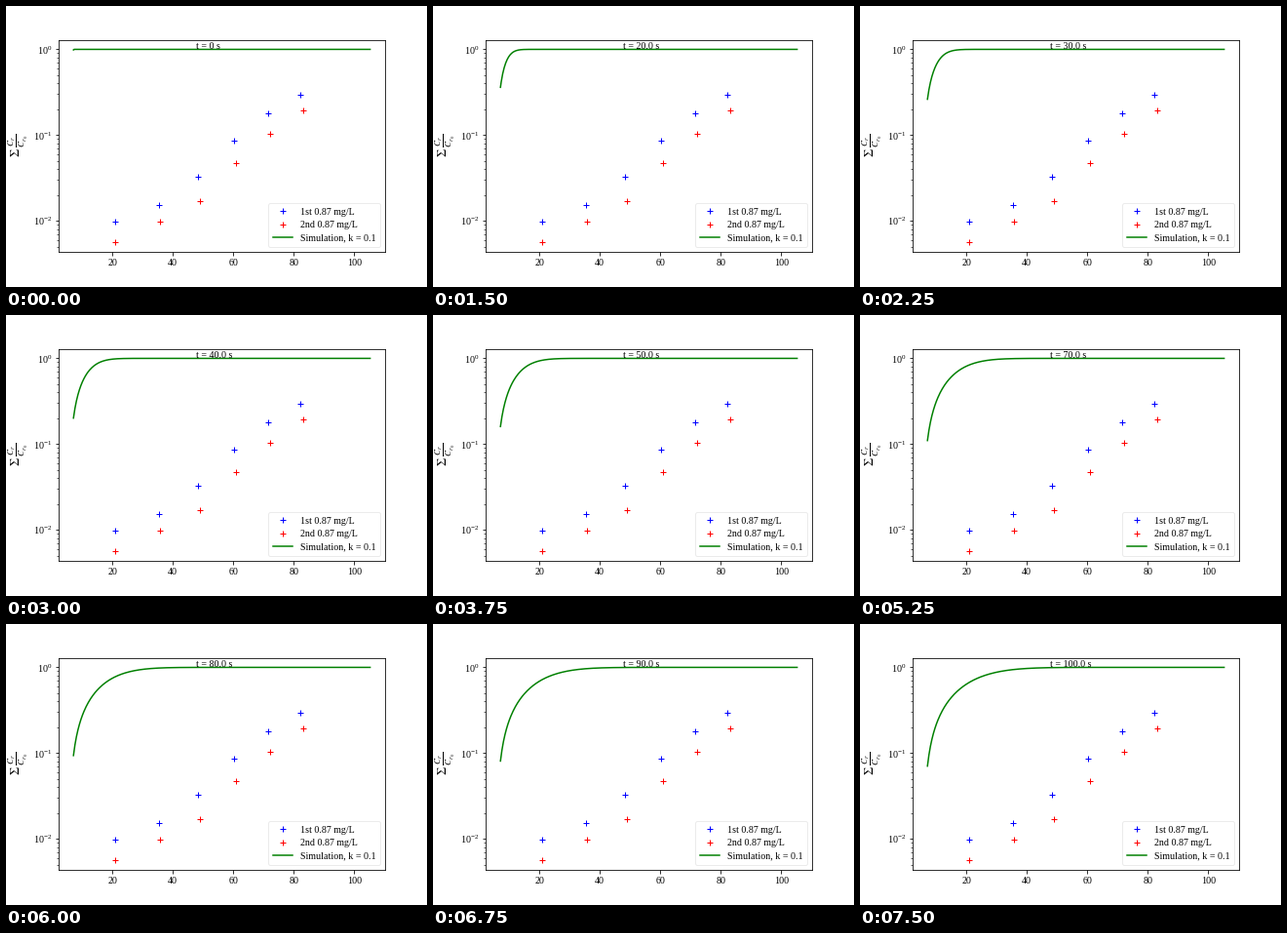
Write a matplotlib script that moves like this. It is 432 px wide and 288 px high and loops after 8 s.

```python
import math

import numpy as np
import matplotlib.pyplot as plt
from matplotlib.animation import FuncAnimation

plt.rcParams.update({
    "font.family": "Liberation Serif",
    "font.size": 10,
    "mathtext.fontset": "stix",
    "figure.subplot.bottom": 0.125,
    "figure.subplot.top": 0.88,
})

INTERVAL = 250   # ms per drawn frame
FRAMES = 32      # 8 s loop
HOLD = 3         # drawn frames per simulation step
STEP = 10        # simulated seconds per step

# measured samples: positions draw closer together, the second run lags a little
n = np.arange(6)
pos = 20.9 + 14.5 * n - 0.75 * n * (n - 1) + 0.062 * n * (n - 1) * (n - 2)
first = [0.0097, 0.0153, 0.0327, 0.0855, 0.178, 0.295]
second = [0.00566, 0.0097, 0.0168, 0.0472, 0.1035, 0.194]

x = np.linspace(7.06, 105.3, 400)
erf = np.vectorize(math.erf)
Z = np.linspace(0, 4, 4000)
ERF_Z = erf(Z)


def profile(t):
    """Depletion front that spreads from the left edge in proportion to time."""
    t = max(t, 0.2)
    edge = 1 / (1 + 0.0777 * t + 0.00054 * t * t)
    start = np.interp(edge, ERF_Z, Z)
    return erf(start + 4.5 / t * (x - x[0]))


fig, ax = plt.subplots(figsize=(6, 4), dpi=72)
ax.plot(pos, first, "b+", label="1st 0.87 mg/L")
ax.plot(pos + 0.2 * n, second, "r+", label="2nd 0.87 mg/L")
line, = ax.plot(x, profile(0), "g-", label="Simulation, k = 0.1")
clock = ax.text(47.6, 1.02, "t = 0 s")

ax.set_yscale("log")
ax.set_xlim(2.15, 110.2)
ax.set_ylim(10 ** -2.3613, 10 ** 0.1124)
ax.set_ylabel(r"$\Sigma\;\frac{C_r}{C_{r_0}}$", fontsize=13, labelpad=3)
ax.legend(loc="lower right", edgecolor="0.9", borderpad=0.45, labelspacing=0.45)


def update(frame):
    t = frame // HOLD * STEP
    line.set_ydata(profile(t))
    clock.set_text(f"t = {t:.1f} s" if t else "t = 0 s")
    return line, clock


anim = FuncAnimation(fig, update, frames=FRAMES, interval=INTERVAL,
                     init_func=lambda: update(0), repeat=True, repeat_delay=0)
plt.show()
```
